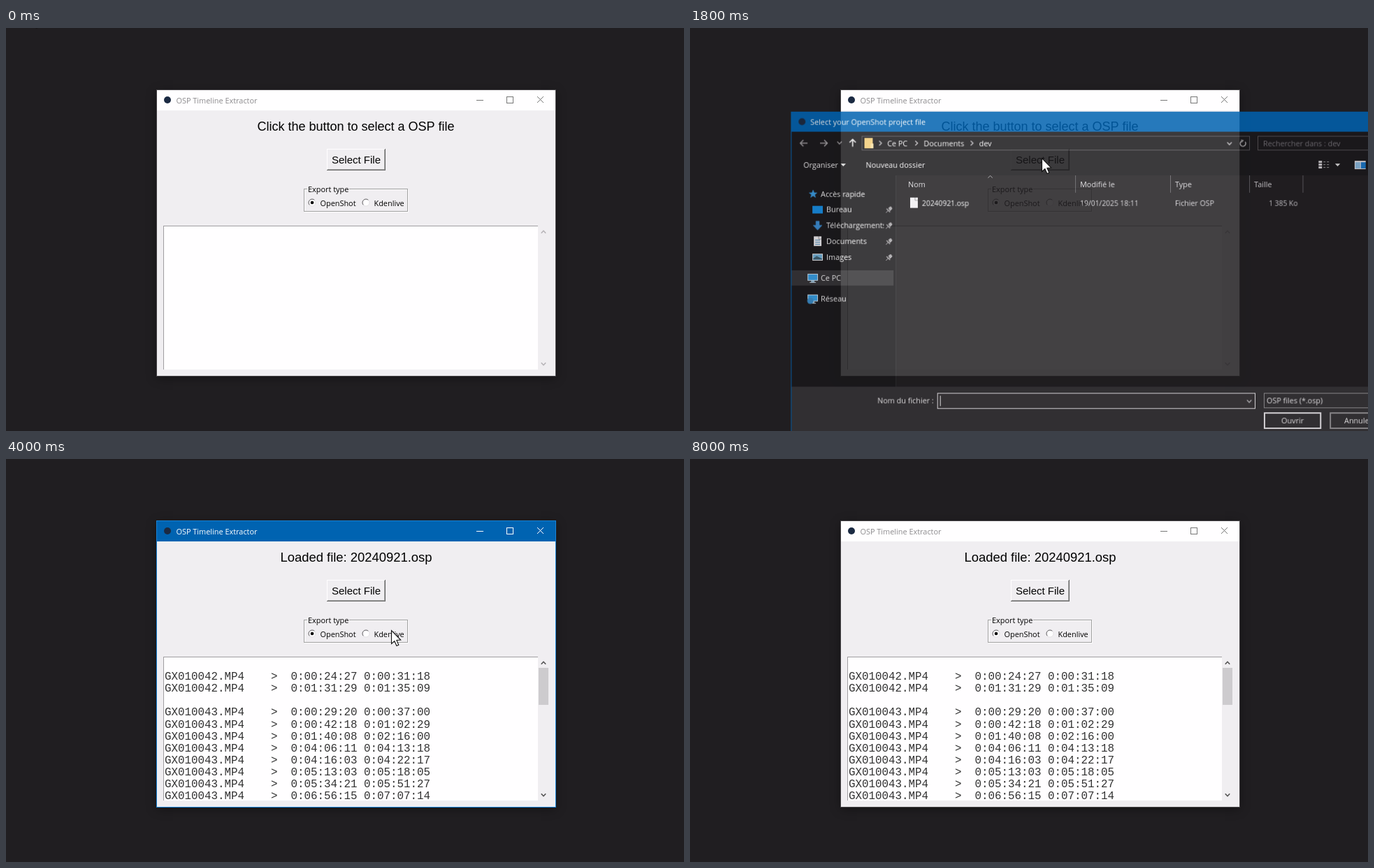
Animation of 970x577 px, one loop 8120 ms. Source, as an HTML page with a canvas:

```html
<!DOCTYPE html>
<html lang="en">
<head>
<meta charset="utf-8">
<title>OSP Timeline Extractor</title>
<style>
html, body { margin: 0; width: 100%; height: 100%; overflow: hidden; background: #201e21; }
canvas { display: block; }
</style>
</head>
<body>
<canvas id="stage" width="970" height="577"></canvas>
<script>
const LOOP = 8120, TICK = 40, W = 970, H = 577;
const BLUE = '#0063b1', FACE = '#f0eef1', WHITE = '#fffeff';
const UI = '"Open Sans", "Noto Sans", sans-serif';
const ARIAL = '"Liberation Sans", sans-serif';
const MONO = '"Liberation Mono", monospace';

// The dialog reaches past the right and bottom of the stage
const RIGHT = W + 60, BOTTOM = H + 40;

const screen = document.getElementById('stage').getContext('2d');
const layer = document.createElement('canvas');
layer.width = RIGHT;
layer.height = BOTTOM;
const dialog = layer.getContext('2d');
let c = screen;

// Drawing helpers
function box(x, y, w, h, color) {
  c.fillStyle = color;
  c.fillRect(x, y, w, h);
}
function frame(x, y, w, h, color, width = 1) {
  c.strokeStyle = color;
  c.lineWidth = width;
  c.strokeRect(x + width / 2, y + width / 2, w - width, h - width);
}
function line(points, color, width = 1, fill) {
  c.beginPath();
  for (let i = 0; i < points.length; i += 2) c.lineTo(points[i], points[i + 1]);
  if (fill) {
    c.closePath();
    c.fillStyle = fill;
    c.fill();
  }
  c.strokeStyle = color;
  c.lineWidth = width;
  c.stroke();
}
function disc(x, y, r, color) {
  c.beginPath();
  c.arc(x, y, r, 0, 7);
  c.fillStyle = color;
  c.fill();
}
function arc(x, y, r, from, color) {
  c.beginPath();
  c.arc(x, y, r, from, from + Math.PI);
  c.strokeStyle = color;
  c.lineWidth = 1;
  c.stroke();
}
function text(s, x, y, color = '#fff', size = 10.9, font = UI, align = 'left') {
  c.font = `${size}px ${font}`;
  c.textAlign = align;
  c.fillStyle = color;
  c.fillText(s, x, y);
}
function chevron(x, y, dx, dy, color, width = 1.3) {
  // dx, dy give the direction of the tip
  const s = 3.2;
  line([x - dx * 1.7 - dy * s, y - dy * 1.7 - dx * s, x + dx * 1.7, y + dy * 1.7,
        x - dx * 1.7 + dy * s, y - dy * 1.7 + dx * s], color, width);
}
function arrow(x, y, dx, dy, color) {
  line([x - dx * 5, y - dy * 5, x + dx * 5, y + dy * 5], color, 1.5);
  line([x + dx - dy * 4.5, y + dy - dx * 4.5, x + dx * 5.5, y + dy * 5.5,
        x + dx + dy * 4.5, y + dy + dx * 4.5], color, 1.5);
}
function dropMark(x, y) {
  line([x - 3, y - 1.5, x + 3, y - 1.5, x, y + 1.5], '#ddd', 1, '#ddd');
}

// Main window
const CLIPS = [
  [],
  ['GX010042', '0:00:24:27', '0:00:31:18'],
  ['GX010042', '0:01:31:29', '0:01:35:09'],
  [],
  ['GX010043', '0:00:29:20', '0:00:37:00'],
  ['GX010043', '0:00:42:18', '0:01:02:29'],
  ['GX010043', '0:01:40:08', '0:02:16:00'],
  ['GX010043', '0:04:06:11', '0:04:13:18'],
  ['GX010043', '0:04:16:03', '0:04:22:17'],
  ['GX010043', '0:05:13:03', '0:05:18:05'],
  ['GX010043', '0:05:34:21', '0:05:51:27'],
  ['GX010043', '0:06:56:15', '0:07:07:14']
];
function previousFrame(time) {
  const [h, m, s, f] = time.split(':').map(Number);
  const n = ((h * 60 + m) * 60 + s) * 30 + f - 1;
  const pad = v => String(Math.floor(v)).padStart(2, '0');
  return [h, pad(n / 1800 % 60), pad(n / 30 % 60), pad(n % 30)].join(':');
}

function drawRadio(x, label, labelX, selected) {
  disc(x, 250, 5, WHITE);
  arc(x, 250, 5, Math.PI * .75, '#5c5a5d');
  arc(x, 250, 5, -Math.PI * .25, '#e4e2e5');
  if (selected) disc(x, 250, 2.3, '#000');
  text(label, labelX, 255, '#000');
}

function drawWindow({ active, pressed, loaded, kdenlive, shifted }) {
  c.save();
  c.shadowColor = 'rgba(0,0,0,.4)';
  c.shadowBlur = 14;
  c.shadowOffsetY = 3;
  box(216, 89, 570, 409, FACE);
  c.restore();
  frame(215, 88, 572, 411, active ? '#1883d7' : '#474548');
  box(216, 89, 570, 29, active ? BLUE : WHITE);
  disc(231, 103, 5, '#1b2a42');
  text('OSP Timeline Extractor', 243.5, 107.5, active ? '#fff' : '#8c8a8d');
  const icon = active ? '#fff' : '#777';
  box(673, 103, 10, 1, icon);
  frame(716, 98, 10, 10, icon);
  line([760, 98, 769, 107], icon);
  line([769, 98, 760, 107], icon);

  if (loaded) text('Loaded file: 20240921.osp', 501, 147, '#000', 18.4, ARIAL, 'center');
  else text('Click the button to select a OSP file', 500.5, 147, '#000', 18, ARIAL, 'center');

  const [lit, dark] = pressed ? ['#696969', WHITE] : [WHITE, '#696969'];
  box(459, 173, 84, 31, dark);
  box(459, 173, 83, 30, lit);
  box(460, 174, 82, 29, pressed ? FACE : '#a0a0a0');
  box(460, 174, 81, 28, FACE);
  const push = pressed ? 1 : 0;
  text('Select File', 501 + push, 194 + push, '#000', 15, ARIAL, 'center');

  frame(427, 231, 149, 33, WHITE);
  frame(426, 230, 149, 33, '#a0a0a0');
  box(431, 226, 60, 9, FACE);
  text('Export type', 432, 235, '#000');
  drawRadio(438, 'OpenShot', 449.5, !kdenlive);
  drawRadio(515, 'Kdenlive', 526.5, kdenlive);

  box(225, 283, 536, 206, WHITE);
  box(225, 283, 536, 1, '#a09ea1');
  box(225, 283, 1, 206, '#a09ea1');
  const mark = loaded ? '#505050' : '#b5b3b6';
  chevron(769, 292, 0, -1, mark, 1.6);
  chevron(769, 481, 0, 1, mark, 1.6);
  if (!loaded) return;
  box(762, 299, 14, 53, '#cdcbce');
  c.save();
  c.beginPath();
  c.rect(226, 284, 535, 204);
  c.clip();
  CLIPS.forEach(([name, ...times], i) => {
    if (!name) return;
    const [start, end] = shifted ? times.map(previousFrame) : times;
    text(`${name}.MP4    >  ${start} ${end}`, 227, 299 + 17.1 * i, '#333', 15.83, MONO);
  });
  c.restore();
}

// File dialog
const PLACES = [
  ['Accès rapide', 184, 237], ['Bureau', 192, 259], ['Téléchargements', 192, 282],
  ['Documents', 192, 305], ['Images', 192, 328], ['Ce PC', 184, 358], ['Réseau', 184, 388]
];
function drawPage(x, y, w, h) {
  box(x, y, w, h, '#f4f2f5');
  line([x + w - 4, y, x + w - 4, y + 4, x + w, y + 4], '#999');
}
function drawMonitor(x, y) {
  box(x, y, 15, 10, '#d5e6f2');
  box(x + 1, y + 1, 13, 8, '#36a2e8');
  box(x + 5, y + 10, 5, 2, '#8fb9d4');
  box(x + 3, y + 12, 9, 1, '#cfe2ee');
}
function drawPlaceIcons() {
  const star = [];
  for (let i = 0; i < 10; i++) {
    const r = i % 2 ? 2.6 : 6, a = i * Math.PI / 5 - Math.PI / 2;
    star.push(173 + r * Math.cos(a), 237 + r * Math.sin(a));
  }
  line(star, '#3aa0e8', .5, '#3aa0e8');
  box(172, 254, 15, 11, '#1590e8');
  line([177, 276, 182, 276, 182, 282, 186, 282, 179.5, 289, 173, 282, 177, 282],
       '#3b8fd6', .5, '#3b8fd6');
  drawPage(174, 298, 11, 14);
  for (let y = 303; y < 311; y += 3) box(176, y, 7, 1, '#4a8ec0');
  box(172, 323, 15, 10, '#eee');
  box(173, 324, 13, 8, '#72b5dc');
  line([173, 331, 178, 327, 186, 331], '#356', 1, '#467');
  drawMonitor(165, 352);
  drawMonitor(165, 382);
  disc(169, 391, 4.5, '#3a8fcc');
}
function drawDialog({ hover, chosen }) {
  const width = RIGHT - 141;
  c.clearRect(0, 0, RIGHT, BOTTOM);
  box(141, 118, width, BOTTOM - 118, '#201e21');
  box(141, 118, width, 29, BLUE);
  disc(157, 132.5, 5, '#1b2a42');
  text('Select your OpenShot project file', 169, 137);

  box(141, 147, width, 63, '#1a181b');
  arrow(160, 163.5, -1, 0, '#a5a3a6');
  arrow(188, 163.5, 1, 0, '#a5a3a6');
  chevron(211, 163, 0, 1, '#a5a3a6');
  arrow(230, 163.5, 0, -1, '#fff');
  frame(243, 153, 560, 21, '#535154');
  box(247, 156, 12, 15, '#f5cf7a');
  box(256, 164, 4, 7, '#fbe3a6');
  for (const x of [270, 322, 402]) chevron(x, 163.5, 1, 0, '#c8c6c9');
  text('Ce PC', 280, 167.5);
  text('Documents', 332.5, 167.5);
  text('dev', 412.5, 167.5);
  chevron(773.5, 164, 0, 1, '#c8c6c9');
  c.beginPath();
  c.arc(793, 164, 4, -.6, 4.3);
  c.strokeStyle = '#c8c6c9';
  c.stroke();
  line([790, 159, 793.5, 159.5, 791, 162.5], '#c8c6c9');
  frame(814, 153, 210, 21, '#535154');
  text('Rechercher dans : dev', 822, 167.5, '#77757a');

  text('Organiser', 159, 199);
  dropMark(216.5, 195);
  text('Nouveau dossier', 249, 199);
  for (let y = 189; y < 200; y += 4) {
    box(902, y, 5, 3, '#d8d6d9');
    box(909, y + 1, 3, 1, '#999');
    box(914, y + 1, 3, 1, '#999');
  }
  dropMark(929.5, 195);
  box(954, 189, 16, 12, '#e6e4e7');
  box(955, 191, 7, 9, '#8abbe0');
  box(963, 191, 7, 9, '#1877c9');

  box(141, 210, 151, 305, '#1a181b');
  box(292, 210, 1, 305, '#2e2c2f');
  box(142, 347, 147, 22, '#353336');
  drawPlaceIcons();
  c.save();
  c.beginPath();
  c.rect(141, 210, 134, 305);
  c.clip();
  for (const [name, x, y] of PLACES) text(name, x, y + 4);
  c.restore();
  for (let y = 259; y < 330; y += 23) {
    line([278, y + 5, 282, y + 1], '#aaa8ab');
    line([279, y - 1, 284, y + 4], '#aaa8ab', 1.5);
    line([282, y - 2, 285, y - 4, 287, y - 1, 284, y + 2], '#aaa8ab', 1, '#aaa8ab');
  }

  chevron(428.5, 212, 0, -1, '#a5a3a6', 1);
  for (const x of [551, 688, 802, 879]) box(x, 210, 1, 25, '#636164');
  text('Nom', 310, 226.5, '#e2e0e3');
  text('Modifié le', 558, 226.5, '#e2e0e3');
  text('Type', 695, 226.5, '#e2e0e3');
  text('Taille', 809, 226.5, '#e2e0e3');
  if (hover) box(307, 239, 569, 22, chosen ? '#777578' : '#4d4b4e');
  drawPage(313, 242, 11, 15);
  const pale = '#dedcdf';
  text('20240921.osp', 330, 254, '#fff', 10.4);
  text('19/01/2025 18:11', 558, 254, pale, 10.4);
  text('Fichier OSP', 695, 254, pale, 10.7);
  text('1 385 Ko', 872, 254, pale, 10.4, UI, 'right');
  if (hover) {
    for (const [x, w] of [[330, 67], [558, 84], [695, 57], [830, 42]]) box(x, 255, w, 1, pale);
  }

  box(141, 515, width, BOTTOM - 515, '#353336');
  text('Nom du fichier :', 347, 539, '#fff', 10.9, UI, 'right');
  box(352, 524, 459, 23, '#39373a');
  frame(352, 524, 459, 23, '#f4f2f5');
  if (chosen) text('20240921.osp', 357, 539, '#fff', 10.4);
  else box(356, 528, 1, 15, '#fff');
  chevron(802, 536, 0, 1, '#c8c6c9');
  frame(823, 524, 178, 22, '#9b999c');
  text('OSP files (*.osp)', 827, 539);
  frame(823, 552, 83, 24, '#f4f2f5', 2);
  text('Ouvrir', 864.5, 567.5, '#fff', 10.9, UI, 'center');
  frame(918, 552, 83, 24, '#9b999c', 2);
  text('Annuler', 939, 567.5);
  box(141, 118, 1, BOTTOM - 118, BLUE);
}

// Pointer: start, end, x, y, vertical bend
const MOVES = [
  [200, 840, 503, 186], [2040, 2480, 349, 241], [3560, 4000, 551, 245, -21],
  [4760, 4920, 470, 242], [4920, 5000, 477, 242],
  [5600, 5700, 551, 250, -2], [5720, 5760, 546, 250],
  [6280, 6440, 459, 256], [7200, 7720, 70, -26]
];
const clamp = v => Math.min(1, Math.max(0, v));
const smooth = v => v * v * (3 - 2 * v);

function pointerAt(t) {
  let x = 35, y = -22;
  for (const [start, end, toX, toY, bend = 0] of MOVES) {
    if (t <= start) break;
    const e = smooth(clamp((t - start) / (end - start)));
    x += (toX - x) * e;
    y += (toY - y) * e + bend * 4 * e * (1 - e);
  }
  return [x, y];
}
function drawPointer(x, y) {
  c.save();
  c.translate(Math.round(x) + .5, Math.round(y) + .5);
  line([0, 0, 0, 19, 4.3, 15.2, 7.4, 22, 10.3, 20.8, 7.4, 14, 13.2, 13.6, 0, 0],
       '#111', 1.1, '#fff');
  c.restore();
}

function render(t) {
  const within = (from, to) => t >= from && t < to;
  c = screen;
  box(0, 0, W, H, '#201e21');
  drawWindow({
    active: within(1440, 1720) || within(2840, 8000),
    pressed: within(1480, 1560),
    loaded: t >= 3200,
    kdenlive: within(4520, 5280) || within(6080, 6800),
    shifted: within(4520, 5280) || within(6120, 6800)
  });
  const [x, y] = pointerAt(t);

  if (within(1720, 3040)) {
    const closing = clamp((t - 2840) / 180);
    const shrink = t < 1880 ? .044 * Math.exp(-(t - 1720) / 47) : .05 * closing * closing;
    c = dialog;
    drawDialog({ hover: t > 2000 && y >= 239, chosen: t >= 2760 });
    c = screen;
    c.save();
    c.globalAlpha = clamp(.14 + (t - 1720) / 114) * (1 - closing);
    c.translate(560, 334);
    c.scale(1 - shrink, 1 - shrink);
    c.drawImage(layer, -560, -334);
    c.restore();
  }
  drawPointer(x, y);
}

const began = performance.now();
function tick() {
  const t = (performance.now() - began) % LOOP;
  render(Math.floor(t / TICK) * TICK);
  requestAnimationFrame(tick);
}
tick();
</script>
</body>
</html>
```
